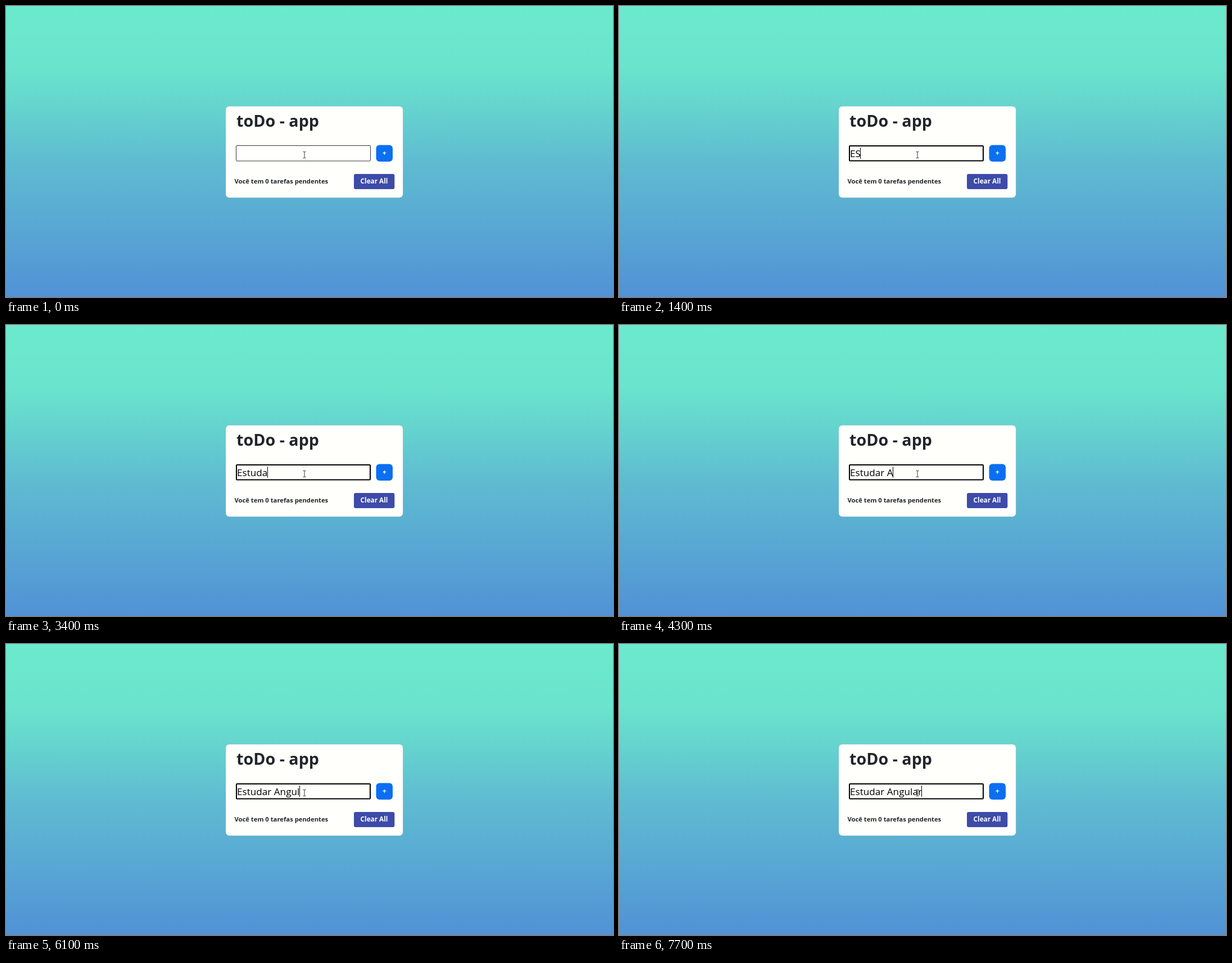
These frames come from a looping animation (1080x518 px, 8 s). An HTML page:

```html
<!DOCTYPE html>
<html lang="pt-BR">
<head>
<meta charset="utf-8">
<title>toDo - app</title>
<style>
  html, body {
    margin: 0;
    width: 100%;
    height: 100%;
    overflow: hidden;
  }
  body {
    background: linear-gradient(#6ceacd 0%, #6ae4cd 21%, #65d4ce 35%, #5fbcd1 53%, #5192d6 100%);
  }
  svg {
    display: block;
    width: 1080px;
    height: 518px;
  }
  text {
    font-family: "Open Sans", "Noto Sans", sans-serif;
    font-weight: 700;
    font-size: 11.75px;
    fill: #212529;
    white-space: pre;
  }
  .title { font-size: 28.7px; }
  .status { font-size: 11.28px; }
  .label { fill: #fff; text-anchor: middle; }
  .entry { font-size: 17.15px; font-weight: 400; fill: #000; }
  .card { fill: #fffffc; stroke: #000; stroke-opacity: .1; stroke-width: .8; }
  .field { fill: none; stroke: #33363a; }
  .field.focus { stroke: #000; stroke-width: 2; }
  .beam { fill: none; stroke: #333; stroke-width: 1; }
</style>
</head>
<body>
<svg viewBox="0 0 1080 518">
  <rect class="card" x="390.9" y="178.4" width="315.4" height="162.8" rx="6.5"/>
  <text class="title" x="410" y="215">toDo - app</text>

  <rect class="field" id="field"/>
  <text class="entry" id="entry" x="411" y="268.7"></text>
  <rect id="caret" y="252" width="1" height="20"/>

  <rect x="658.5" y="247.5" width="29.5" height="29.5" rx="6" fill="#0b6ff2"/>
  <text class="label" x="673.4" y="266">+</text>

  <text class="status" x="406.4" y="316.3">Você tem 0 tarefas pendentes</text>
  <rect x="619" y="299" width="72.3" height="27" rx="3" fill="#3d4ba9"/>
  <text class="label" x="655" y="316.3">Clear All</text>

  <path class="beam" d="M528.5 259.5h2l.5.5.5-.5h2M531 260v10M528.5 270.5h2l.5-.5.5.5h2"/>
</svg>
<script>
  const LOOP = 8000, FOCUS = 400;
  // [start in ms, typed text, caret shown]
  const steps = [
    [0, "", false],
    [1100, "E", true],
    [1400, "ES", true],
    [2000, "ES", false],
    [2200, "Es", true],
    [2800, "Es", false],
    [2900, "Est", true],
    [3200, "Estud", true],
    [3400, "Estuda", true],
    [3600, "Estudar", true],
    [3800, "Estudar ", true],
    [4300, "Estudar A", true],
    [4600, "Estudar An", true],
    [5200, "Estudar An", false],
    [5600, "Estudar Ang", true],
    [5700, "Estudar Angu", true],
    [6100, "Estudar Angul", true],
    [6200, "Estudar Angula", true],
    [6500, "Estudar Angular", true],
    [7100, "Estudar Angular", false],
    [7700, "Estudar Angular", true]
  ];
  const [field, entry, caret] = ["field", "entry", "caret"].map(id => document.getElementById(id));

  function setAttrs(el, attrs) {
    for (const name in attrs) el.setAttribute(name, attrs[name]);
  }

  function drawField(focused) {
    const inset = focused ? 1 : 0.5;
    field.classList.toggle("focus", focused);
    setAttrs(field, {
      x: 409 + inset, y: 248 + inset,
      width: 240 - 2 * inset, height: 28.4 - 2 * inset,
      rx: focused ? 1 : 1.5
    });
  }

  function draw(time) {
    const t = time % LOOP;
    const [, text, shown] = steps.filter(step => step[0] <= t).pop();
    drawField(t >= FOCUS);
    if (entry.textContent !== text) entry.textContent = text;
    const end = text ? entry.getComputedTextLength() : 0;
    setAttrs(caret, { x: Math.floor(411 + end), visibility: shown ? "visible" : "hidden" });
  }

  const start = performance.now();
  function tick() {
    draw(performance.now() - start);
    requestAnimationFrame(tick);
  }
  tick();
</script>
</body>
</html>
```
